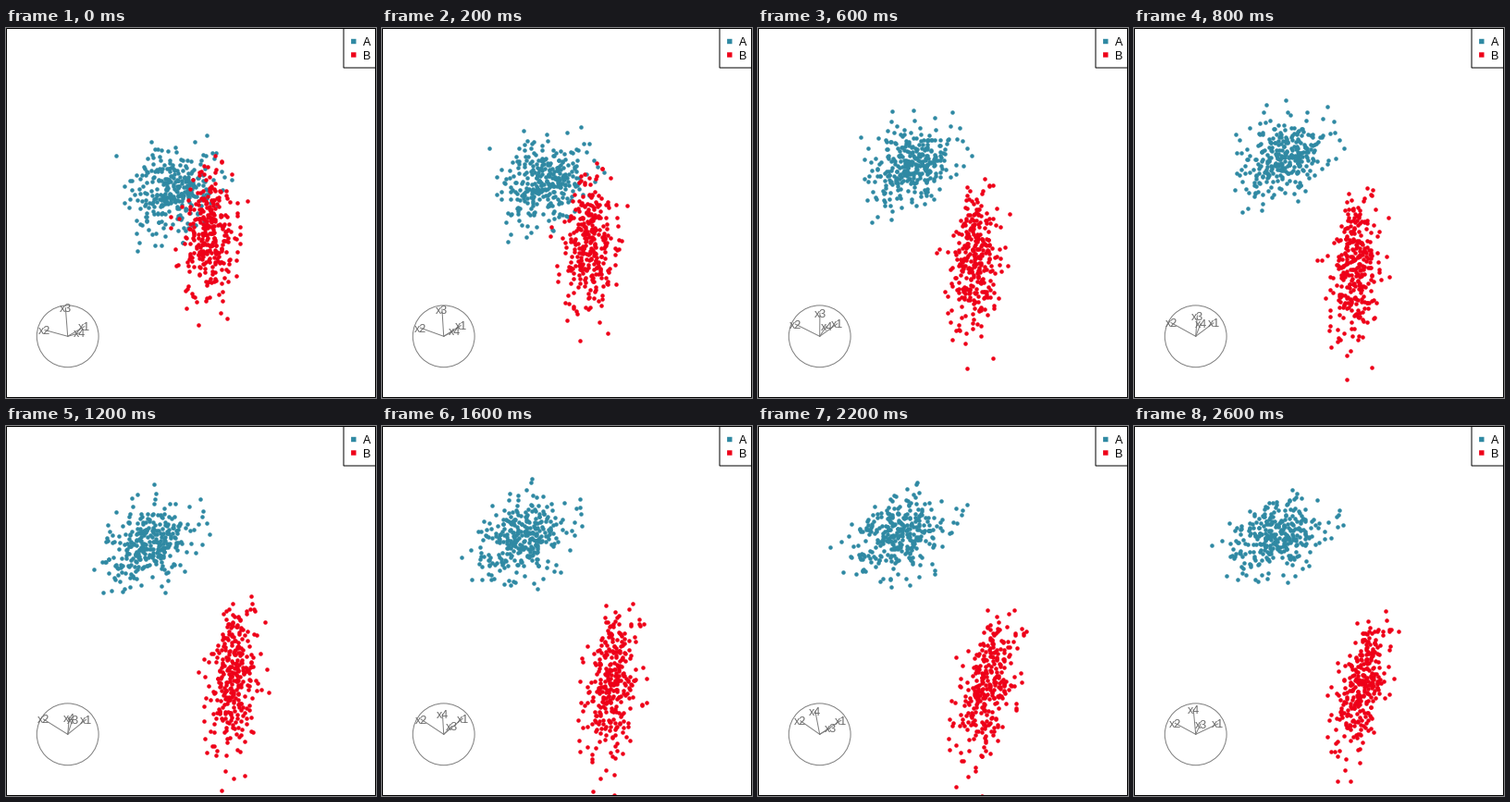
A matplotlib script for the animation above (2.7 s loop, 400 by 400 pixels).

```python
import numpy as np
import matplotlib.pyplot as plt
from matplotlib.animation import FuncAnimation
from matplotlib.patches import Circle, Rectangle

SIZE, DPI, FRAMES = 400, 100, 27
PX = 72 / DPI  # one pixel in points
TEAL, RED, GREY = "#2F89A3", "#EE0018", "#7F7F7F"
HUB, RADIUS = np.array([66.7, 333.3]), 33.4
LABEL_DROP = np.array([0, 1.6])
FONT = 12.5 * PX

# The tour turns at a few planes: frame -> screen x and y (down) of x1..x4
STOPS = {
    0: ([0.54, -0.75, -0.09, 0.39], [-0.31, -0.22, -0.93, -0.10]),
    19: ([0.65, -0.72, 0.35, -0.10], [-0.55, -0.50, -0.11, -0.74]),
    22: ([0.70, -0.62, 0.34, -0.14], [-0.47, -0.44, -0.20, -0.77]),
    26: ([0.73, -0.68, 0.16, -0.08], [-0.35, -0.38, -0.35, -0.83]),
}


def orthonormal(plane):
    u, _, vt = np.linalg.svd(plane, full_matrices=False)
    return u @ vt


def slerp(a, b, t):
    """Turn each column of a towards b at constant speed."""
    angle = np.arccos(np.clip((a * b).sum(axis=0), -1, 1))
    return (np.sin((1 - t) * angle) * a + np.sin(t * angle) * b) / np.sin(angle)


times = list(STOPS)
planes = [orthonormal(np.transpose(stop)) for stop in STOPS.values()]


def basis(frame):
    """4x2 orthonormal projection at a frame."""
    i = max(k for k in range(len(times) - 1) if times[k] <= frame)
    t = (frame - times[i]) / (times[i + 1] - times[i])
    return orthonormal(slerp(planes[i], planes[i + 1], t))


def cluster(rng, mean, cov, count=310):
    z = rng.standard_normal((2 * count, 4))
    z = z[np.linalg.norm(z, axis=1) < 3.7][:count]
    z -= z.mean(axis=0)
    return mean + z @ np.linalg.cholesky(cov).T


rng = np.random.default_rng(7)
gap = np.array([-5, -129, -5, -140])
cov_a = np.array([
    [1050, 0, 0, 0],
    [0, 420, -120, 0],
    [0, -120, 650, -120],
    [0, 0, -120, 350],
])
cov_b = np.array([
    [1150, 780, 80, 450],
    [780, 750, 80, 300],
    [80, 80, 900, 0],
    [450, 300, 0, 400],
])
clouds = [cluster(rng, -gap / 2, cov_a), cluster(rng, gap / 2, cov_b)]

plt.rcParams["font.family"] = "Liberation Sans"
fig = plt.figure(figsize=(SIZE / DPI, SIZE / DPI), dpi=DPI, facecolor="white")
ax = fig.add_axes([0, 0, 1, 1])
ax.set_xlim(0, SIZE)
ax.set_ylim(SIZE, 0)
ax.axis("off")

dots = [
    ax.scatter([], [], s=(4.5 * PX) ** 2, c=color, linewidths=0, zorder=2)
    for color in (TEAL, RED)
]

ax.add_patch(Circle(HUB, RADIUS, fill=False, ec=GREY, lw=PX))
spokes = [ax.plot([], [], color=GREY, lw=PX)[0] for _ in range(4)]
labels = [
    ax.text(0, 0, f"x{i}", color="#6A6A6A", fontsize=FONT,
            ha="center", va="center", zorder=4)
    for i in range(1, 5)
]


def box(x, y, w, h, **style):
    ax.add_patch(Rectangle((x, y), w, h, zorder=5, snap=False, **style))


box(0.5, 0.5, 399, 399, fill=False, ec="black", lw=PX)
box(365, 0.5, 34.5, 42.5, fc="white", ec="black", lw=PX)
for name, color, y in (("A", TEAL, 14.5), ("B", RED, 29)):
    box(373.1, y - 2.7, 5.4, 5.4, fc=color, lw=0)
    ax.text(386, y + 4.8, name, fontsize=FONT, color="black",
            ha="left", va="baseline", zorder=6)


def update(frame):
    plane = basis(frame)
    for dot, cloud in zip(dots, clouds):
        dot.set_offsets(SIZE / 2 + cloud @ plane)
    for spoke, label, tip in zip(spokes, labels, HUB + RADIUS * plane):
        spoke.set_data([HUB[0], tip[0]], [HUB[1], tip[1]])
        label.set_position(tip + LABEL_DROP)
    return [*dots, *spokes, *labels]


anim = FuncAnimation(fig, update, frames=FRAMES, interval=100,
                     repeat=True, repeat_delay=0, blit=False)
plt.show()
```
